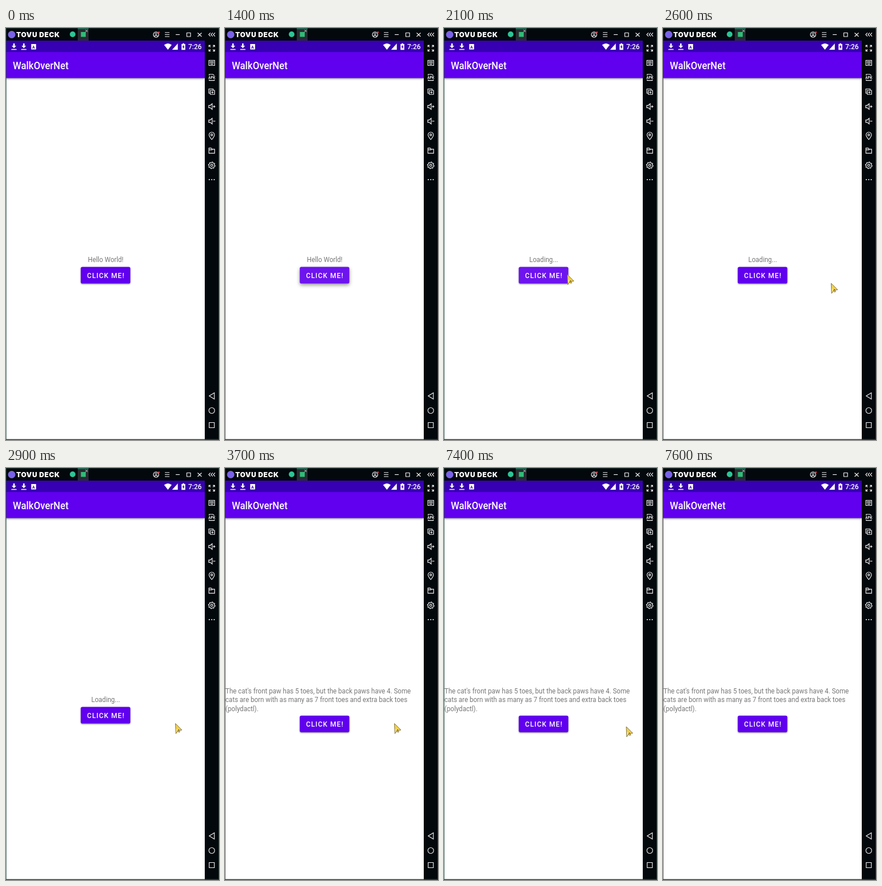
An HTML page with a canvas that plays this animation: 374x720 px, repeating every 8 s.

```html
<!DOCTYPE html>
<html lang="en">
<head>
<meta charset="utf-8">
<style>
html, body { margin: 0; width: 100%; height: 100%; overflow: hidden; background: #03080c; }
canvas { display: block; }
</style>
</head>
<body>
<canvas id="stage" width="374" height="720"></canvas>
<script>
const ctx = document.getElementById('stage').getContext('2d');
const LOOP = 8000, STEP = 100;
const ASPECT = 0.888; // the phone screen has narrow pixels
const SCREEN = 349;   // width of the phone screen
const FONT = 'Roboto, sans-serif';
const VIOLET = '#6000ee', WHITE = '#f4f4f6', DARK = '#03080c';
const FACT = [
  "The cat's front paw has 5 toes, but the back paws have 4. Some",
  'cats are born with as many as 7 front toes and extra back toes',
  '(polydactl).'
];

function rect(x, y, w, h, color) {
  ctx.fillStyle = color;
  ctx.fillRect(x, y, w, h);
}

function disc(x, y, r, color) {
  ctx.fillStyle = color;
  ctx.beginPath();
  ctx.arc(x, y, r, 0, Math.PI * 2);
  ctx.fill();
}

function stroke(d, x = 0, y = 0, width = 1.15, color = WHITE) {
  ctx.save();
  ctx.translate(x, y);
  ctx.strokeStyle = color;
  ctx.lineWidth = width;
  ctx.stroke(new Path2D(d));
  ctx.restore();
}

function fill(d, x, y, color = '#fff') {
  ctx.save();
  ctx.translate(x, y);
  ctx.fillStyle = color;
  ctx.fill(new Path2D(d));
  ctx.restore();
}

function ring(x, y, r, width = 1.15) {
  ctx.strokeStyle = WHITE;
  ctx.lineWidth = width;
  ctx.beginPath();
  ctx.arc(x, y, r, 0, Math.PI * 2);
  ctx.stroke();
}

function label(str, x, y, font, color, align = 'left', aspect = ASPECT, spacing = 0) {
  ctx.save();
  ctx.translate(x, y);
  ctx.scale(aspect, 1);
  ctx.font = font;
  ctx.letterSpacing = spacing + 'px';
  ctx.textAlign = align;
  ctx.fillStyle = color;
  ctx.fillText(str, 0, 0);
  ctx.restore();
}

function titleBar() {
  rect(0, 0, 374, 22, DARK);
  disc(10, 11.5, 6.5, '#7a62e8');
  label('TOVU DECK', 18, 16, '900 12px Inter, sans-serif', '#fff', 'left', 1, 0.6);
  disc(117, 11, 5, '#2cc596');
  rect(126, 0, 19, 22, '#282c31');
  rect(126, 0, 19, 1.5, '#25a97c');
  rect(131.5, 7, 8.5, 8.5, '#2fbd78');
  stroke('M-2-2 2 2M2-2-2 2', 141.5, 5, 1, '#c8cccf');
  ring(263.5, 11.5, 4.7);
  ring(263.5, 10, 1.6, 1);
  stroke('M-3 3.2Q0-.5 3 3.2', 263.5, 11.5);
  disc(268.5, 7.5, 1.5, '#d83a48');
  stroke('M-4-3.5H4M-4 0H4M-4 3.5H4', 283, 11.5);
  stroke('M298 11.5H305');
  stroke('M317.5 8.5H324V15H317.5Z');
  stroke('M336.5 8.5 343.5 15M343.5 8.5 336.5 15');
  for (let i = 0; i < 3; i++) stroke('M3-3.2 0 0 3 3.2', 356 + i * 4, 11.5);
}

function speaker(y, plus) {
  stroke('M-5-2H-2.5L1-5V5L-2.5 2H-5Z', 361, y);
  stroke('M2.5 0H6.5' + (plus ? 'M4.5-2V2' : ''), 361, y);
}

function gear(x, y) {
  let d = '';
  for (let i = 0; i < 32; i++) {
    const a = (i + 0.5) * Math.PI / 16;
    const r = i % 4 < 2 ? 5.9 : 4.5;
    d += (i ? 'L' : 'M') + r * Math.cos(a) + ' ' + r * Math.sin(a);
  }
  stroke(d + 'Z', x, y, 1.1);
  ring(x, y, 1.9);
}

function sideBar() {
  rect(SCREEN, 22, 374 - SCREEN, 698, DARK);
  stroke('M-5-2V-5H-2M2-5H5V-2M5 2V5H2M-2 5H-5V2M-5-5-2-2M5-5 2-2M5 5 2 2M-5 5-2 2', 361.3, 35.3);
  stroke('M-5-4.5H5V4.5H-5Z', 361.3, 61);
  stroke('M-3.5-2.2H3.5M-3.5 0H3.5M-2.5 2.4H2.5', 361.3, 61, 1.2);
  stroke('M-4.5-3.2V-5.3H2L4.5-3.2M-4.5 3.7V5.3H4.5V3.7', 361.3, 86.3);
  label('APK', 361.3, 89, `700 7.3px ${FONT}`, WHITE, 'center', 0.85);
  stroke('M-2.5-2.5H5V4.5H-2.5ZM-2.5 2.5H-5V-5H2.5V-2.5M1.2-1V3M-.8 1H3.2', 361.2, 111.5);
  speaker(137.3, true);
  speaker(162.8, false);
  stroke('M0 6.5C-3 3-4.7 1-4.7-1.8A4.7 4.7 0 0 1 4.7-1.8C4.7 1 3 3 0 6.5Z', 361.3, 188.5);
  ring(361.3, 186.8, 1.6);
  stroke('M-5 4.5V-4.5H-1L.5-2.5H5V4.5ZM-5-1.5H1', 361.3, 214.3);
  gear(361.3, 240);
  for (const x of [357, 361.3, 365.6]) disc(x, 265, 1.1, WHITE);
  stroke('M4.5-5.5V5.5L-4.5 0Z', 361.3, 643);
  ring(361.3, 668.5, 5);
  stroke('M-4.5-4.5H4.5V4.5H-4.5Z', 361.3, 694);
}

function appBar() {
  ctx.save();
  ctx.shadowColor = 'rgba(0,0,0,.4)';
  ctx.shadowBlur = 3;
  ctx.shadowOffsetY = 1.2;
  rect(0, 42, SCREEN, 45.5, VIOLET);
  ctx.restore();
  rect(0, 22, SCREEN, 20, '#3700b3');
  for (const x of [14, 31.3]) {
    fill('M-1.3-5.5H1.3V-1.5H4L0 2.7-4-1.5H-1.3ZM-4.5 4.2H4.5V5.8H-4.5Z', x, 32.5);
  }
  rect(44.3, 28, 8.5, 9.5, '#fff');
  label('A', 48.5, 35.7, `700 8px ${FONT}`, '#3700b3', 'center');
  fill('M0 5.5-6.7-3Q0-8 6.7-3Z', 284.3, 32.5);
  fill('M5 5.5H-5L5-5.5Z', 296.7, 32.5);
  fill('M-3.3-4.5H-1.3V-5.8H1.3V-4.5H3.3V5.8H-3.3Z', 311.5, 32.5);
  fill('M.6-3.2-2 1H-.4V4L2 0H.6Z', 311.5, 32.5, '#3700b3');
  label('7:26', 320, 37.3, `500 13.5px ${FONT}`, '#fff');
  label('WalkOverNet', 12, 72.4, `500 18.9px ${FONT}`, '#fff');
}

// press: lighter face, 0..1; lift: raised shadow, 0..1
function button(y, press, lift) {
  ctx.save();
  ctx.shadowColor = 'rgba(0,0,0,.42)';
  ctx.shadowBlur = 2.5 + lift * 3.5;
  ctx.shadowOffsetY = 1.3 + lift * 1.5;
  ctx.fillStyle = VIOLET;
  ctx.beginPath();
  ctx.roundRect(131.3, y, 87, 29, 2.8);
  ctx.fill();
  ctx.restore();
  ctx.fillStyle = `rgba(255,255,255,${0.08 * press})`;
  ctx.fill();
  label('CLICK ME!', 175.4, y + 19.4, `500 13.5px ${FONT}`, '#fff', 'center', ASPECT, 1.2);
}

function message(lines, x, align) {
  const top = 409.3 - (lines.length - 1) * 7.65;
  lines.forEach((s, i) => label(s, x, top + i * 15.3, `400 13.05px ${FONT}`, '#777', align));
}

function pointer(x, y) {
  const d = 'M0 0 11.5 11.4 6.8 12 8 14.5 5.8 15.4 4.5 13.2 .8 17.8Z';
  fill(d, x, y, '#f0d04a');
  fill('M.4 9 4.2 10 1.3 15.7Z', x, y, '#f7e48e');
  stroke(d, x, y, 0.9, '#7a683c');
  stroke('M4.5 13.2 5.4 10.6 6.8 12', x, y, 1, '#4d4030');
}

const clamp = v => Math.min(1, Math.max(0, v));

function pointerAt(t) {
  if (t < 2000 || t >= 7600) return null;
  if (t < 2100) return [198, 428];
  if (t < 4900) {
    const p = clamp((t - 2100) / 600);
    const k = p * (2 - p);
    return [216.5 + 81 * k, 430.8 + 15.7 * k];
  }
  if (t < 7400) return [298, 447.5];
  return t < 7500 ? [320, 452] : [355.5, 458];
}

function draw(t) {
  const loaded = t >= 3000;
  rect(0, 0, 374, 720, '#fff');
  appBar();
  if (loaded) message(FACT, 0.8, 'left');
  else message([t < 1700 ? 'Hello World!' : 'Loading...'], 175, 'center');
  const press = t < 1400 ? 0 : clamp((2600 - t) / 500);
  const lift = t < 1400 ? 0 : clamp((1900 - t) / 200);
  button(loaded ? 432.8 : 417.5, press, lift);
  titleBar();
  sideBar();
  rect(0, 0, 1, 720, 'rgba(20,60,50,.65)');
  rect(0, 718.5, 374, 1.5, '#1d4a3e');
  rect(373, 0, 1, 720, '#25352f');
  rect(0, 0, 374, 0.7, '#24423a');
  const at = pointerAt(t);
  if (at) pointer(...at);
}

const start = performance.now();
function frame() {
  const t = (performance.now() - start) % LOOP;
  draw(Math.floor(t / STEP) * STEP);
  requestAnimationFrame(frame);
}
frame();
</script>
</body>
</html>
```
